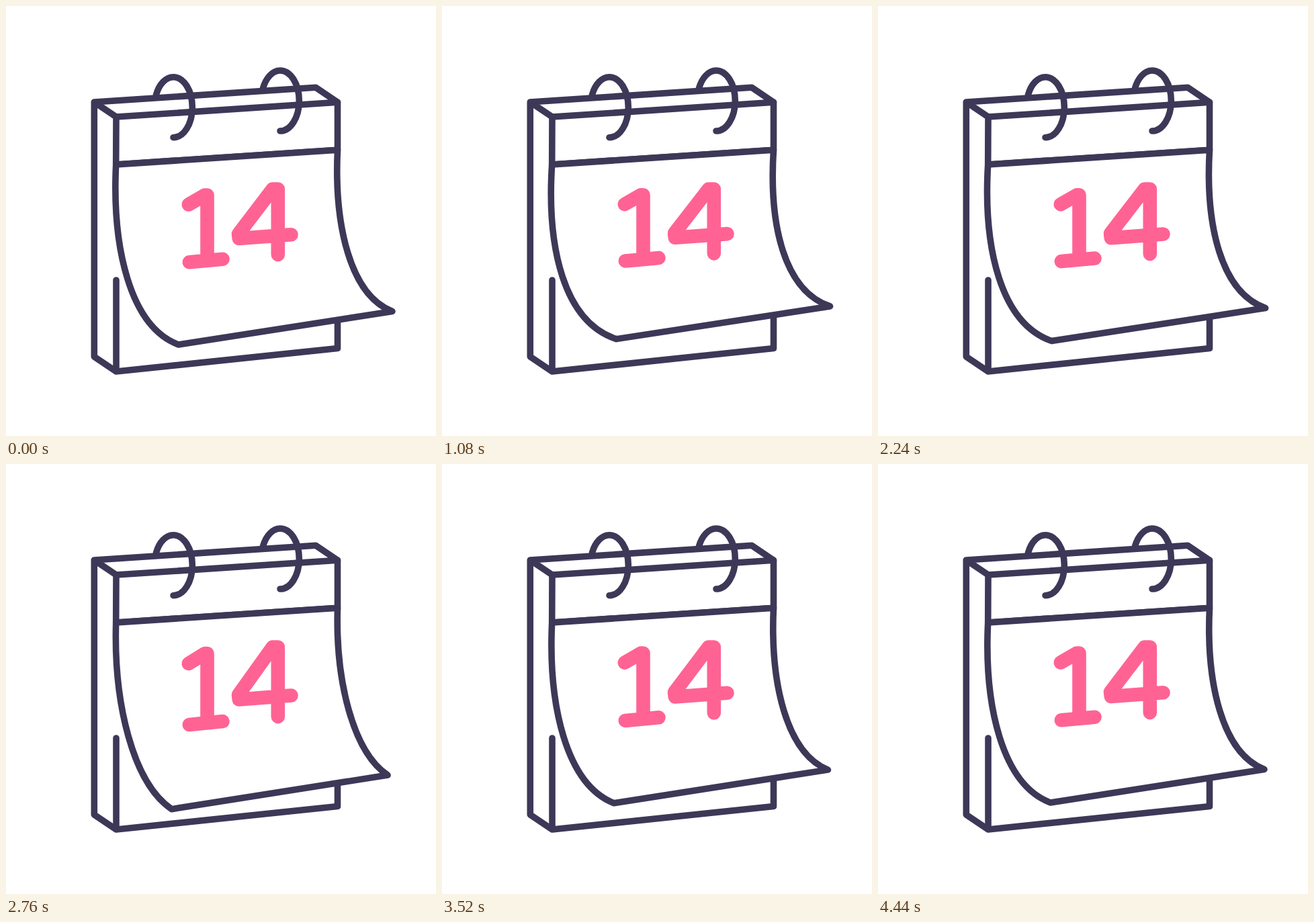
An HTML page that plays this animation: 640 px wide and 640 px high, repeating every 5040 ms.

```html
<!DOCTYPE html>
<html lang="en">
<head>
<meta charset="utf-8">
<title>Calendar</title>
<style>
  html, body { margin: 0; width: 100%; height: 100%; overflow: hidden; background: #fff; }
  svg { display: block; width: 100%; height: 100%; }
  path { stroke-linecap: round; stroke-linejoin: round; fill: none; }
  .ink { stroke: #3d3857; stroke-width: 9.6; }
  #sheet { fill: #fff; }
  #day path { stroke: #ff6394; stroke-width: 20.6; vector-effect: non-scaling-stroke; }
</style>
</head>
<body>
<svg viewBox="0 0 640 640">
  <path class="ink" d="M131.3 143 461 121.3 493.5 143.3 164 165ZV522L164 544 493.5 509.5V440M164 408V544"/>
  <path class="ink" d="M164 165 163.7 236 493.5 214.3V143.3"/>
  <path class="ink" id="sheet"/>
  <path class="ink" id="ring" d="M223.5 132A28.3 45 0 0 1 249 105.7A28.3 45 0 0 1 249 195.7"/>
  <use href="#ring" x="159" y="-9.7"/>
  <g id="day">
    <path d="M271.8 295.5 296 281.5H299.5V378M272.8 381.3 322.5 376.7"/>
    <path d="M404.8 370V272.5H396.8L346 339.3 346.8 346 424.5 340.3"/>
  </g>
</svg>
<script>
const LOOP = 5040, STEP = 40;
const DELAY = 80, BEAT = 520;   // start of the swing, time between turning points
const DAY_TOP = 271;

// Bend of the sheet at each turning point: 0 rests, 1 hangs lowest, negative lifts
const turns = [0, 1.02, -0.44, 0.59, -0.32, 0.53, -0.3, 0.2, 0];

const sheet = document.getElementById('sheet');
const day = document.getElementById('day');

function bendAt(t) {
  const beat = Math.min(Math.max((t - DELAY) / BEAT, 0), turns.length - 1.001);
  const i = Math.floor(beat);
  const ease = (1 - Math.cos(Math.PI * (beat - i))) / 2;
  return turns[i] + (turns[i + 1] - turns[i]) * ease;
}

function draw(now) {
  const bend = bendAt(Math.floor(now % LOOP / STEP) * STEP);
  const down = Math.max(bend, 0), up = Math.max(-bend, 0);

  // Side curve as offsets from its hinge; the right one is smaller by perspective
  const side = [
    [5 * bend - 6, 124 - 10 * down],
    [21 + 8 * bend, 241 - 5 * down - 17 * up],
    [93 - 21 * down + 7 * up, 268 + 20 * bend]
  ];
  const place = (x, y, sx, sy) => side.map(p => [x + p[0] * sx, y + p[1] * sy]);
  const left = place(163.7, 236, 1, 1);
  const right = place(493.5, 214.3, 0.876 + 0.048 * down, 0.896);
  sheet.setAttribute('d',
    `M163.7 236C${left}L${right[2]}C${right[1]} ${right[0]} 493.5 214.3Z`);

  const stretch = 1 + 0.15 * down - 0.05 * down * down - 0.04 * up;
  day.setAttribute('transform',
    `translate(0 ${DAY_TOP * (1 - stretch)}) scale(1 ${stretch})`);
}

const start = performance.now();
function tick() {
  draw(performance.now() - start);
  requestAnimationFrame(tick);
}
tick();
</script>
</body>
</html>
```
